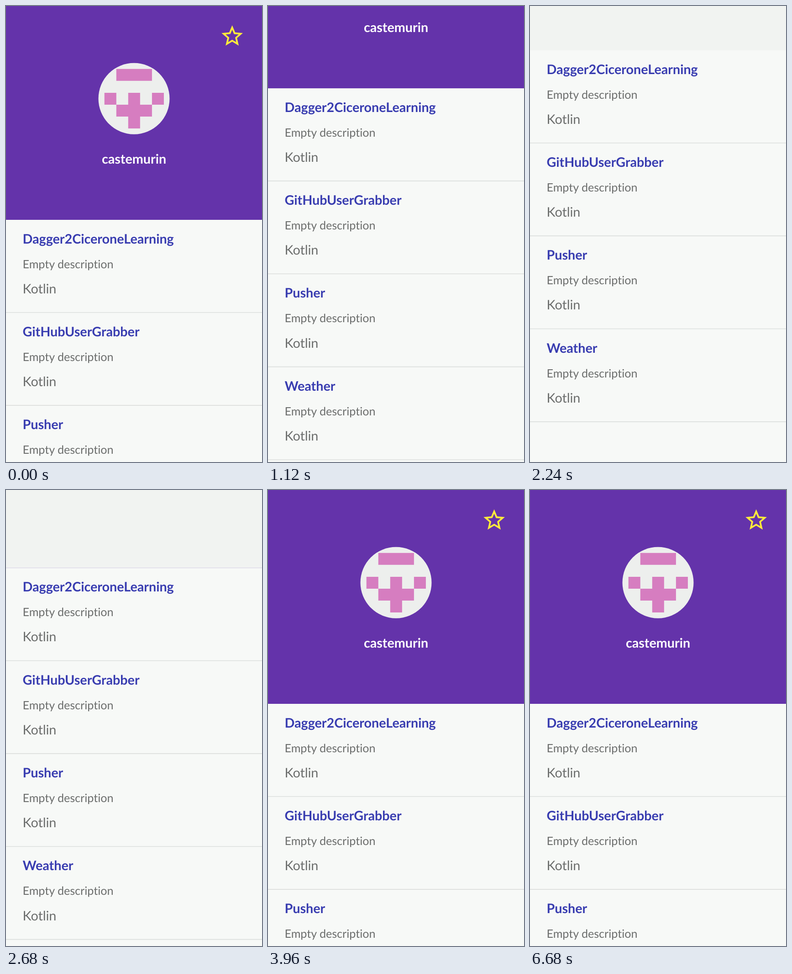
An HTML page for the animation above (6.72 s loop, 561x998 px).

```html
<!DOCTYPE html>
<html lang="en">
<head>
<meta charset="utf-8">
<title>Profile scroll</title>
<style>
  html, body { margin: 0; width: 100%; height: 100%; overflow: hidden; background: #f7f9f7; }
  svg { display: block; width: 561px; height: 998px; font: 28.7px Lato, sans-serif; font-variant-ligatures: none; }
  .name { font-weight: 700; fill: #fff; text-anchor: middle; }
  .title { font-weight: 700; fill: #383cb0; }
  .about { font-size: 25.1px; fill: #6b6d6c; }
  .lang { fill: #6b6d6c; }
</style>
</head>
<body>
<svg viewBox="0 0 561 998" text-rendering="geometricPrecision">
  <rect width="561" height="998" fill="#f7f9f7"/>
  <g id="page">
    <rect width="561" height="468" fill="#6433aa"/>
    <path transform="translate(467.6 37.7) scale(2.337)" fill="#ffeb3b" d="M22 9.24l-7.19-.62L12 2 9.19 8.63 2 9.24l5.46 4.73L5.82 21 12 17.27 18.18 21l-1.63-7.03zM12 15.4l-3.76 2.27 1-4.28-3.32-2.88 4.38-.38L12 6.1l1.71 4.04 4.38.38-3.32 2.88 1 4.28z"/>
    <circle cx="280.5" cy="202.7" r="78" fill="#edefed"/>
    <path transform="translate(215.7 137.8) scale(26.05)" fill="#d67dc0" d="M1 0h3v1h-3zM0 2h1v1h1v-1h1v1h1v-1h1v1h-1v1h-1v1h-1v-1h-1v-1h-1z"/>
    <text class="name" x="280.5" y="344.5">castemurin</text>
    <rect id="scrim" width="561" height="468" fill="#f1f3f1"/>
    <g id="list" transform="translate(0 468)"></g>
  </g>
</svg>
<script>
const LOOP = 6720, STEP = 40, HEADER = 468, ROW = 203.4;
const repos = ['Dagger2CiceroneLearning', 'GitHubUserGrabber', 'Pusher', 'Weather'];
const page = document.getElementById('page');
const scrim = document.getElementById('scrim');

document.getElementById('list').innerHTML = repos.map((repo, i) => `
  <g transform="translate(0 ${i * ROW})">
    <text class="title" x="36.5" y="51.5">${repo}</text>
    <text class="about" x="36.5" y="105.5">Empty description</text>
    <text class="lang" x="36.5" y="160.7">Kotlin</text>
    <path d="M0 202.7H561" stroke="#dcdfdd" stroke-width="1.6"/>
  </g>`).join('');

// [time, visible header height]
const drag = [
  [0, 468], [600, 468], [680, 461], [800, 377], [1110, 185], [1360, 84], [1440, 64.6],
  [1600, 50], [2040, 97], [2240, 97], [2720, 179], [2960, 235], [3200, 360], [3400, 468], [LOOP, 468]
];

const slope = i => (drag[i + 1][1] - drag[i][1]) / (drag[i + 1][0] - drag[i][0]);

// Harmonic mean of neighbouring slopes keeps the curve free of overshoot.
const tangents = drag.map((_, i) => {
  if (i === 0 || i === drag.length - 1) return 0;
  const a = slope(i - 1), b = slope(i);
  return a * b <= 0 ? 0 : 2 * a * b / (a + b);
});

function headerHeight(t) {
  const i = drag.findIndex((_, k) => t < drag[k + 1][0]);
  const [t0, h0] = drag[i], [t1, h1] = drag[i + 1];
  const d = t1 - t0, u = (t - t0) / d, v = 1 - u;
  return h0 * (1 + 2 * u) * v * v + h1 * u * u * (3 - 2 * u)
    + d * u * v * (tangents[i] * v - tangents[i + 1] * u);
}

// Cubic easing with control points (x1, 0) and (x2, 1).
function ease(x, x1, x2) {
  if (x <= 0) return 0;
  if (x >= 1) return 1;
  let lo = 0, hi = 1, s;
  for (let n = 0; n < 24; n++) {
    s = (lo + hi) / 2;
    const at = 3 * x1 * s * (1 - s) ** 2 + 3 * x2 * s * s * (1 - s) + s ** 3;
    if (at < x) lo = s; else hi = s;
  }
  return s * s * (3 - 2 * s);
}

const scrimAlpha = t => ease((t - 1110) / 600, 0.4, 1) - ease((t - 2770) / 600, 0, 0.2);

function draw(t) {
  page.setAttribute('transform', `translate(0 ${headerHeight(t) - HEADER})`);
  scrim.setAttribute('opacity', scrimAlpha(t));
}

const start = performance.now();
function tick() {
  const t = (performance.now() - start) % LOOP;
  draw(Math.floor(t / STEP) * STEP);
  requestAnimationFrame(tick);
}
tick();
</script>
</body>
</html>
```
